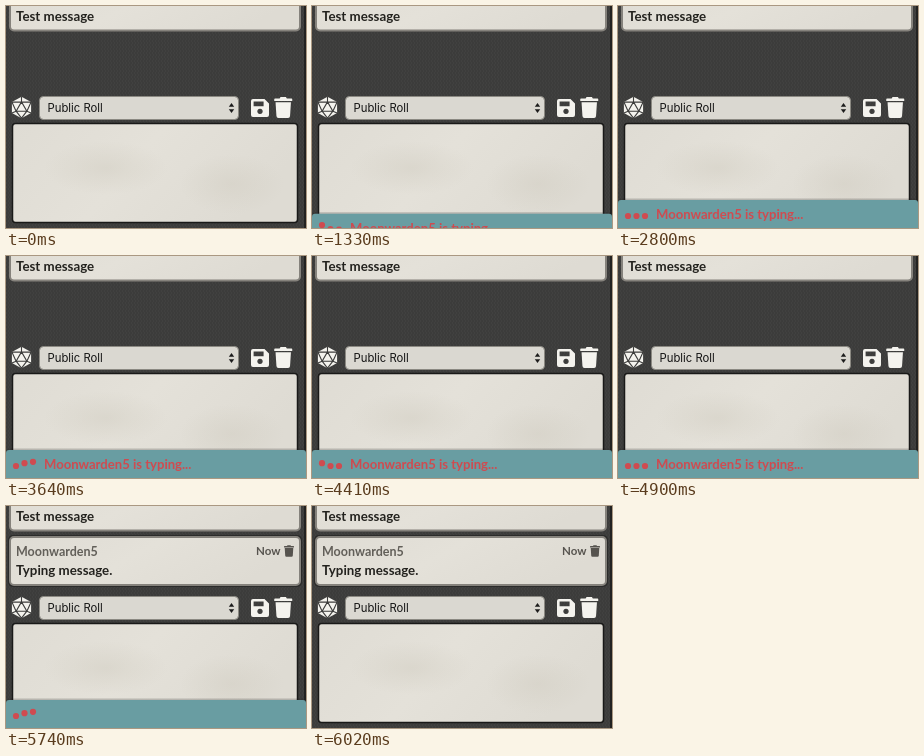
Recreate the animation shown at these times as an HTML page. Size 300 by 222 pixels, loop 7.21 s.

```html
<!DOCTYPE html>
<html lang="en">
<head>
<meta charset="utf-8">
<title>Typing indicator</title>
<style>
  html, body { margin: 0; width: 100%; height: 100%; overflow: hidden; background: #3b3b3a; }
  svg { display: block; width: 300px; height: 222px; }
  text { font: 700 13.3px Lato, "Open Sans", sans-serif; fill: #23221e; }
  .name { font-size: 12.5px; fill: #625f59; }
  .now { font-size: 11.5px; fill: #56534e; }
  .option { font: 400 11.3px Inter, Roboto, sans-serif; fill: #151515; }
  .typing { font-size: 13.1px; }
  .typing, .dot { fill: #cf4b50; }
  .card { fill: url(#paper); stroke: #85827c; stroke-width: 2; }
  .icon { fill: #f4f3ee; }
</style>
</head>
<body>
<svg viewBox="0 0 300 222">
  <defs>
    <linearGradient id="paper" x2="1" y2=".3">
      <stop offset="0" stop-color="#dfdcd4"/>
      <stop offset=".5" stop-color="#e4e1d9"/>
      <stop offset="1" stop-color="#dedbd3"/>
    </linearGradient>
    <radialGradient id="stain">
      <stop offset="0" stop-color="#d3cfc4" stop-opacity=".55"/>
      <stop offset="1" stop-color="#d3cfc4" stop-opacity="0"/>
    </radialGradient>
    <pattern id="cloth" width="3" height="4" patternUnits="userSpaceOnUse">
      <rect width="3" height="4" fill="#3c3c3b"/>
      <path d="M.5 0v2M2.5 2v2" stroke="#414140"/>
    </pattern>
    <symbol id="trash" viewBox="0 0 18 21" overflow="visible">
      <path d="M0 2.2Q0 1.4 .8 1.4H5.4L6.3 0h5.4l.9 1.4h4.6q.8 0 .8.8V4H0zM1.3 5.3h15.4l-.9 13.8q-.1 1.9-2 1.9H4.2q-1.9 0-2-1.9z"/>
    </symbol>
  </defs>

  <rect width="300" height="222" fill="url(#cloth)"/>
  <rect x="298" width="2" height="222" fill="#222221"/>

  <rect class="card" x="4" y="-20" width="290" height="44.5" rx="4"/>
  <text x="10" y="15">Test message</text>

  <g id="message">
    <rect x="2" y="29" width="294" height="52" rx="5" fill="#2b2b2a"/>
    <rect class="card" x="4" y="31" width="290" height="48" rx="4"/>
    <text class="name" x="10" y="50">Moonwarden5</text>
    <text class="now" x="274.5" y="49" text-anchor="end">Now</text>
    <use href="#trash" x="278" y="39" width="10" height="12" fill="#56534e"/>
    <text x="10" y="69">Typing message.</text>
  </g>

  <g transform="translate(15.5 101.5)" stroke-linejoin="round">
    <path class="icon" d="M0-10.7 9.6-5.4V5.4L0 10.7-9.6 5.4V-5.4z"/>
    <path fill="none" stroke="#3c3c3b" stroke-width="1.1"
      d="M0-5.6 5.4 3.7H-5.4zM0-10.7V-5.6M-9.6-5.4 0-5.6 9.6-5.4 5.4 3.7 9.6 5.4M-9.6-5.4-5.4 3.7-9.6 5.4M-5.4 3.7 0 10.7 5.4 3.7"/>
  </g>

  <rect x="33.5" y="90.5" width="199" height="23" rx="4" fill="#dad8d1" stroke="#8b8982"/>
  <text class="option" x="41.5" y="106">Public Roll</text>
  <path d="M222.8 100.8 225.5 97l2.7 3.8zM222.8 103.2l2.7 3.8 2.7-3.8z" fill="#1c1c1c"/>

  <path class="icon" fill-rule="evenodd"
    d="M247 93h11.5l4.5 4.5V109q0 2-2 2H247q-2 0-2-2V95q0-2 2-2zM247.6 95.6v4.6h10v-4.6zM254 102.7a2.7 2.7 0 1 0 .01 0z"/>
  <use class="icon" href="#trash" x="268" y="91" width="18.5" height="21"/>

  <rect x="6.5" y="117.5" width="285" height="99" rx="3" fill="url(#paper)" stroke="#191918" stroke-width="1.5"/>
  <ellipse cx="100" cy="162" rx="62" ry="27" fill="url(#stain)"/>
  <ellipse cx="226" cy="178" rx="52" ry="30" fill="url(#stain)"/>

  <g id="bar">
    <rect y="-1.5" width="300" height="32" rx="4" fill="#222" opacity=".22"/>
    <rect width="300" height="34" rx="3" fill="#699da2"/>
    <circle class="dot" cx="10" r="3.1"/>
    <circle class="dot" cx="18.5" r="3.1"/>
    <circle class="dot" cx="27" r="3.1"/>
    <text class="typing" id="typing" x="38" y="19">Moonwarden5 is typing...</text>
  </g>
</svg>
<script>
  const LOOP = 7210, STEP = 70;
  const SHOW = 1255, HIDE = 5740, SLIDE = 250;
  const BAR_TOP = 194, BAR_HEIGHT = 28;
  const WAVE = { start: 150, period: 1050, length: 280, delay: 120, lift: 4.6 };

  const byId = id => document.getElementById(id);
  const message = byId('message'), bar = byId('bar'), typing = byId('typing');
  const dots = document.querySelectorAll('.dot');

  // CSS "ease" curve, solved for x by bisection
  function ease(x) {
    x = Math.min(1, Math.max(0, x));
    const bezier = (a, b, u) => 3 * a * u * (1 - u) ** 2 + 3 * b * u * u * (1 - u) + u ** 3;
    let low = 0, high = 1;
    for (let i = 0; i < 24; i++) {
      const mid = (low + high) / 2;
      if (bezier(.25, .25, mid) < x) low = mid; else high = mid;
    }
    return bezier(.1, 1, low);
  }

  function lift(t, i) {
    const phase = (t - WAVE.start + WAVE.period) % WAVE.period - i * WAVE.delay;
    return phase > 0 && phase < WAVE.length
      ? WAVE.lift * Math.sin(Math.PI * phase / WAVE.length) : 0;
  }

  function show(node, on) {
    node.setAttribute('visibility', on ? 'visible' : 'hidden');
  }

  function draw(t) {
    const shown = ease((t - SHOW) / SLIDE) - ease((t - HIDE) / SLIDE);
    show(bar, shown > .001);
    bar.setAttribute('transform', `translate(0 ${BAR_TOP + BAR_HEIGHT * (1 - shown)})`);
    show(message, t >= HIDE);
    typing.style.display = t < HIDE ? '' : 'none';
    dots.forEach((dot, i) => dot.setAttribute('cy', 16 - lift(t, i)));
  }

  const begin = performance.now();
  function tick() {
    const t = (performance.now() - begin) % LOOP;
    draw(Math.floor(t / STEP) * STEP);
    requestAnimationFrame(tick);
  }
  tick();
</script>
</body>
</html>
```
